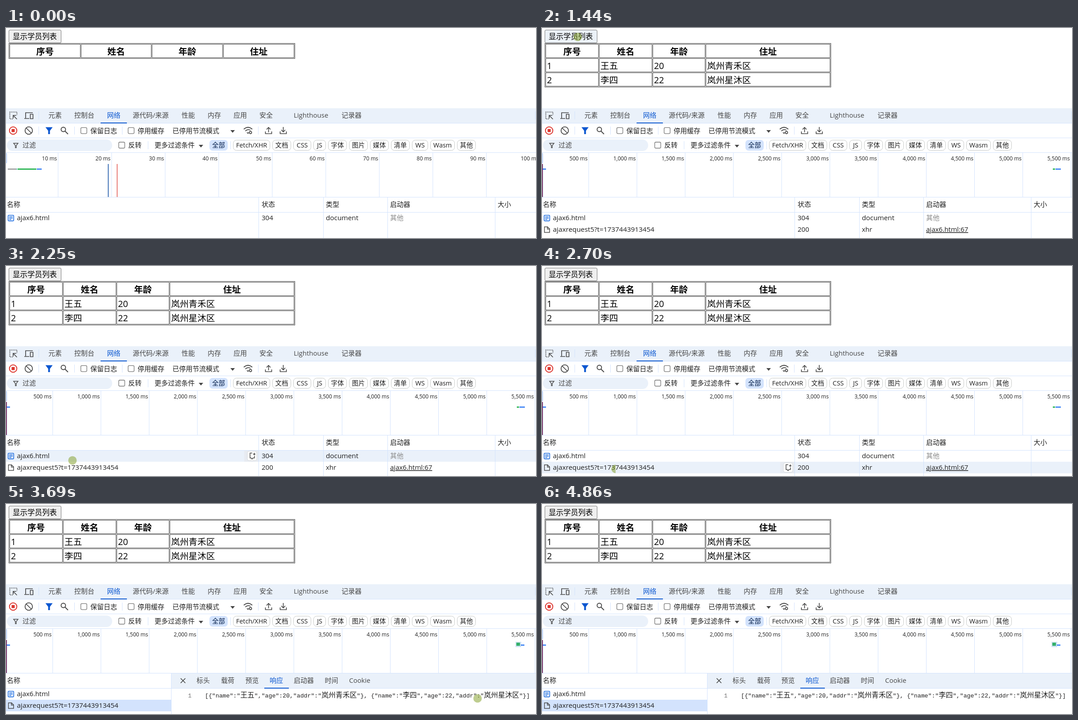
An HTML page for the animation above (5.13 s loop, 1188 px wide and 471 px high).

```html
<!DOCTYPE html>
<html lang="zh">
<head>
<meta charset="utf-8">
<style>
html, body { margin: 0; width: 100%; height: 100%; overflow: hidden; background: #fff; }
svg { display: block; font: 15px "Open Sans", "Noto Sans CJK SC", "Noto Sans CJK", sans-serif; fill: #1f1f1f; }
</style>
</head>
<body>
<svg id="stage" width="1188" height="471" viewBox="0 0 1188 471"></svg>
<script>
const LOOP = 5130, STEP = 90;
const BLUE = '#0b57d0', PALE = '#eaf1fa', LINE = '#d3e3fd', INK = '#474747';

const text = (x, y, s, attrs = '') => `<text x="${x}" y="${y}" ${attrs}>${s}</text>`;
const rect = (x, y, w, h, fill, attrs = '') =>
  `<rect x="${x}" y="${y}" width="${w}" height="${h}" fill="${fill}" ${attrs}/>`;
const path = (d, stroke = INK, width = 1.7, fill = 'none') =>
  `<path d="${d}" stroke="${stroke}" stroke-width="${width}" fill="${fill}"/>`;
const group = (id, body) => `<g id="${id}">${body}</g>`;
const vline = (x, y1, y2, color = LINE, width = 1) => rect(x, y1, width, y2 - y1, color);
const hline = (y, x = 0, w = 1188) => rect(x, y, w, 1, LINE);

// Student table: column edges, then rows of text; the first row is the heading
function table(edges, rows) {
  const border = 'stroke="#444"', pitch = 32;
  let out = rect(6.5, 34.5, 641, rows.length * pitch + 2, '#fff', border);
  rows.forEach((row, r) => row.forEach((s, c) => {
    const x = edges[c], w = edges[c + 1] - x - 2, y = 36.5 + r * pitch;
    out += rect(x, y, w, pitch - 2, '#fff', border);
    out += r
      ? text(x + 2.5, y + 23.5, s, 'font-size="19.7" fill="#000"')
      : text(x + w / 2, y + 23.5, s, 'font-size="19.7" font-weight="700" text-anchor="middle" fill="#000"');
  }));
  return out;
}

function ruler(first, gap, count, label) {
  let out = '';
  for (let i = 0; i < count; i++) {
    const x = first + gap * i;
    out += vline(x, 280, 379) + text(x - 2, 297, label(i + 1), 'font-size="12" text-anchor="end"');
  }
  return out;
}

function chips() {
  const names = ['Fetch/XHR', '文档', 'CSS', 'JS', '字体', '图片', '媒体', '清单', 'WS', 'Wasm', '其他'];
  const widths = [83, 42, 40, 28, 42, 42, 42, 42, 36, 55, 42];
  const label = (x, s, fill) => text(x, 268, s, `font-size="14.4" text-anchor="middle" fill="${fill}"`);
  let x = 509, out = rect(456, 251, 41, 24, LINE, 'rx="7"') + label(476.5, '全部', '#041e49');
  names.forEach((s, i) => {
    out += rect(x + .5, 251.5, widths[i] - 1, 23, '#fff', 'rx="7" stroke="#c4c7c5"');
    out += label(x + widths[i] / 2, s, '#1f1f1f');
    x += widths[i] + 5;
  });
  return out;
}

const tabs = (list, y, active) => list.map(([x, s]) =>
  text(x, y, s, `fill="${s === active ? BLUE : INK}"`)).join('');
const checkbox = (x, y) => rect(x, y, 13.5, 13.5, '#fff', 'rx="2.5" stroke="#757575" stroke-width="1.3"');
const arrow = (x, y) => path(`M${x} ${y}h10l-5 6z`, 'none', 0, INK);
const ring = (x, y, r, color, width) =>
  `<circle cx="${x}" cy="${y}" r="${r}" fill="none" stroke="${color}" stroke-width="${width}"/>`;

function toolbar() {
  return rect(0, 180, 1188, 33, PALE) + [213, 246, 279].map(y => hline(y)).join('')
    // Inspect and device icons
    + `<path d="M15 204H8.5V188.5H24.5V195" fill="none" stroke="${INK}" stroke-width="1.7" stroke-dasharray="2 1.6"/>`
    + path('M16 203V196H23M16.5 196.5L24.5 204.5')
    + path('M44 202V190H60M41 203H52M54.5 193.5H60.5V203.5H54.5Z')
    + vline(73, 187, 205) + vline(1186, 187, 205)
    + tabs([[95, '元素'], [153, '控制台'], [226.5, '网络'], [284, '源代码/来源'], [393.5, '性能'], [452, '内存'],
      [510, '应用'], [568, '安全'], [645, 'Lighthouse'], [752, '记录器']], 201, '网络')
    + rect(212, 212, 59, 2, BLUE)
    // Network controls
    + ring(16, 230, 8.3, '#dc362e', 2) + rect(12.5, 226.5, 7, 7, '#dc362e')
    + ring(51, 230, 8.3, INK, 1.8) + path('M45 224L57 236')
    + path('M88.5 222.5H104.5L98.5 230.5V238H94.5V230.5Z', 'none', 0, BLUE)
    + ring(128.5, 227.5, 5, INK, 1.9) + path('M132 231L139 238', INK, 2)
    + [73, 153, 260, 565].map(x => vline(x, 221, 239)).join('')
    + checkbox(167.7, 223.3) + checkbox(273.7, 223.3)
    + text(189, 235.5, '保留日志') + text(295, 235.5, '停用缓存') + text(373, 235.5, '已停用节流模式')
    + arrow(503, 229)
    + path('M533 227Q542.5 218.5 552 227M536.5 231Q542.5 225.5 548 229.5M540 234L542.5 236.5L544 234')
    + ring(548, 234.5, 2.6, INK, 1.7)
    + path('M581.5 232V237H595.5V232M588.5 234V223M584 227.5L588.5 223L593 227.5')
    + path('M614.5 232V237H628.5V232M621.5 222V233M617 228.5L621.5 233L626 228.5')
    // Filter row
    + rect(2, 250, 236, 26, PALE, 'rx="13"')
    + path('M17 258.5H27L23 263.5V268.5H21V263.5Z', INK, 1.4)
    + text(37, 268, '过滤', `fill="${INK}"`) + checkbox(252.7, 256) + text(274, 268, '反转')
    + vline(318, 254, 272) + text(333, 268, '更多过滤条件') + arrow(432, 262)
    + vline(503, 254, 272) + chips();
}

const fileIcon = path('M5.5 446H12.5L17 450.5V458.5H5.5Z M12 446V451H17', INK, 1.5);
const docIcon = rect(4.7, 420, 12.6, 12.6, 'none', 'rx="1.5" stroke="#1a6be0" stroke-width="1.6"')
  + path('M7 423.5H15M7 426.5H15M7 429.5H12', '#1a6be0', 1.3);

const rowHover = (id, y) => group(id, rect(0, y, 1188, 26, PALE) + rect(534, y, 32, 26, '#e7ebf1')
  + rect(541, y + 2.5, 21, 21, '#fff', 'rx="4" stroke="#d5d8dc"')
  + path(`M552 ${y + 6.5}h-5v11h2.5l2 2.5l2-2.5h3.5v-4.5`, INK, 1.5)
  + path(`M556.5 ${y + 5}l1 3l2.5 1l-2.5 1l-1 2.5l-1-2.5l-2.5-1l2.5-1z`, 'none', 0, INK));

// Monospaced code in which a Chinese character is two cells wide
const code = s => s.replace(/[\u4e00-\u9fff]+/g, m =>
  `<tspan font-size="15.84" font-family="'Noto Sans CJK SC', 'Noto Sans CJK', sans-serif">${m}</tspan>`);

const people = [['1', '王五', '20', '岚州青禾区'], ['2', '李四', '22', '岚州星沐区']];
const head = ['序号', '姓名', '年龄', '住址'];
const json = '[' + people.map(([, name, age, addr]) =>
  `{"name":"${name}","age":${age},"addr":"${addr}"}`).join(', ') + ']';
const mono = `font-family="'Liberation Mono', monospace" font-size="13.2"`;

const stage = document.getElementById('stage');
stage.innerHTML = rect(0, 0, 1188, 471, '#fff')
  + '<rect id="button" x="6.5" y="4.5" width="117" height="29" rx="2.5" stroke="#767676"/>'
  + text(15, 25, '显示学员列表', 'font-size="16.5" fill="#000"')
  + group('emptyTable', table([8.5, 168.5, 327.5, 487.5, 647.5], [head]))
  + group('fullTable', table([8.5, 128.5, 248.5, 367.5, 647.5], [head, ...people]))
  + toolbar()
  + group('shortTime', ruler(116.3, 120, 10, i => i * 10 + ' ms')
    + rect(4, 315, 19, 3, '#a8a8a8') + rect(23, 315, 2, 3, '#7cc4c4') + rect(26, 315, 42, 3, '#34b85a') + rect(69, 315, 11, 3, '#4c8df6')
    + vline(228.5, 305, 379, '#0b4aa0', 1.5) + vline(248.5, 305, 379, '#dc362e', 1.3))
  + group('longTime', ruler(104.2, 108.1, 11, i => (i * 500).toLocaleString('en-US') + ' ms')
    + vline(0, 305, 379, '#c0383c') + vline(1, 305, 379, '#3a3a9c') + rect(2, 315, 7, 3, '#4c8df6')
    + group('bar', rect(1145, 315, 5, 3, '#34b85a') + rect(1151, 315, 12, 3, '#4c8df6'))
    + group('pickedBar', rect(1142, 309, 13, 12, '#cfe3f3') + rect(1144, 311, 8, 7, '#34b06a') + rect(1154, 315, 8, 3, '#4c8df6')))
  + rect(-3, 281, 4.5, 22, '#fff', 'rx="2" stroke="#8ab4f8"')
  + `<rect id="scrub" y="280" width="3" height="99" fill="${BLUE}"/>`
  // Request list
  + rowHover('hover1', 413) + rowHover('hover2', 439)
  + group('selected', rect(0, 439, 371, 26, LINE))
  + hline(379) + hline(413) + [566, 711, 855, 1096].map(x => vline(x, 379, 471)).join('')
  + text(2, 401, '名称') + text(573, 401, '状态') + text(717, 401, '类型') + text(861, 401, '启动器') + text(1102, 401, '大小')
  + docIcon + text(24.5, 431, 'ajax6.html') + text(573, 431, '304') + text(717, 431, 'document', 'font-size="15.3"')
  + text(861, 431, '其他', 'fill="#8a8a8a"')
  + group('request', fileIcon + text(24.5, 457, 'ajaxrequest5?t=1737443913454', 'font-size="15.35"')
    + text(573, 457, '200') + text(717, 457, 'xhr') + text(861, 457, 'ajax6.html:67', 'text-decoration="underline"'))
  // Response panel
  + group('panel', rect(371, 380, 817, 91, '#fff') + rect(371, 380, 817, 33, PALE) + hline(413, 371, 817)
    + vline(370, 380, 471) + path('M391.5 391L402 401.5M402 391L391.5 401.5')
    + tabs([[427, '标头'], [482, '载荷'], [536.5, '预览'], [591, '响应'], [645, '启动器'], [714.5, '时间'], [769, 'Cookie']], 401, '响应')
    + rect(579, 412, 55, 2, BLUE)
    + text(408, 434, '1', mono + ' fill="#757575"') + text(446, 434, code(json), mono))
  + '<path id="cursor" fill="#82a028" fill-opacity=".52"/>';

const el = Object.fromEntries([...stage.querySelectorAll('[id]')].map(e => [e.id, e]));
const show = (id, on) => el[id].setAttribute('visibility', on ? 'visible' : 'hidden');

// Pointer stops: time, x, y
const stops = [[990, 80, 20], [1530, 80, 20], [1980, 218, 333], [2250, 149, 436],
  [2430, 165, 455], [3150, 165, 455], [3600, 1050, 436], [3690, 1057, 436], [4050, 1057, 436]];

function pointer(t) {
  const i = stops.findIndex(s => s[0] > t);
  if (i < 1) return null;
  const [t0, x0, y0] = stops[i - 1], [t1, x1, y1] = stops[i];
  const k = (t - t0) / (t1 - t0);
  return [x0 + (x1 - x0) * k, y0 + (y1 - y0) * k];
}

function draw(now) {
  const t = Math.floor(now % LOOP / STEP) * STEP;
  const loaded = t >= 1260, open = t >= 2880;
  const at = pointer(t), [x, y] = at || [-50, -50];

  show('emptyTable', !loaded);
  show('fullTable', loaded);
  show('shortTime', !loaded);
  show('longTime', loaded);
  show('request', loaded);
  show('bar', loaded && !open);
  show('pickedBar', open);
  show('selected', open);
  show('panel', open);
  show('hover1', !open && y >= 413 && y < 439);
  show('hover2', !open && y >= 439);
  show('scrub', !open && y >= 280 && y < 379);
  el.scrub.setAttribute('x', x + 6);
  el.button.setAttribute('fill', at && y < 34 ? '#ebf1f7' : '#efefef');

  // A press shows only the left half of the spot
  const pressed = t === 990 || t === 2700;
  el.cursor.setAttribute('d', `M${x} ${y - 9.5}a9.5 9.5 0 0 0 0 19` + (pressed ? 'z' : 'a9.5 9.5 0 0 0 0 -19z'));
  show('cursor', at);
  requestAnimationFrame(draw);
}
requestAnimationFrame(draw);
</script>
</body>
</html>
```
